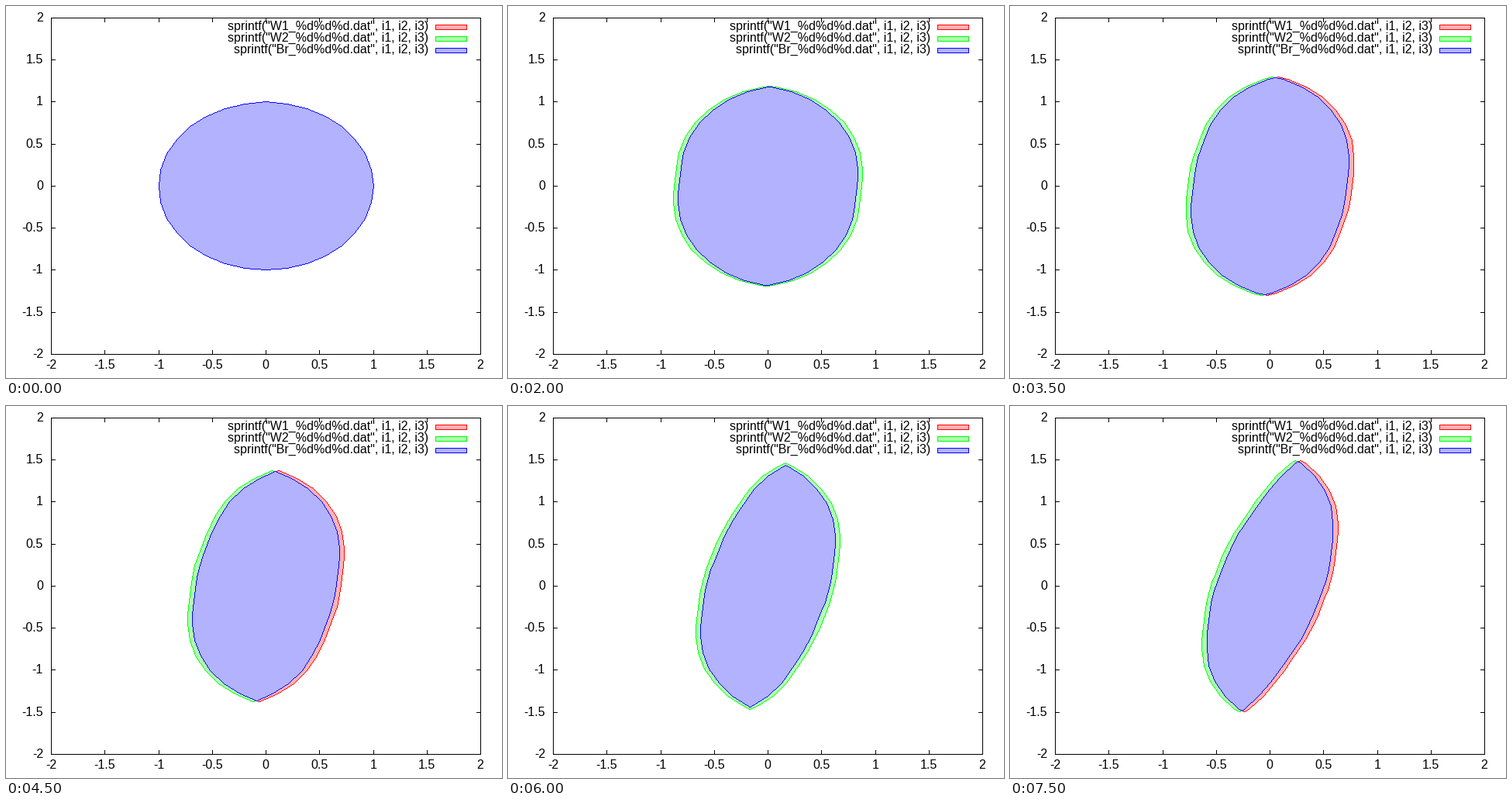
Recreate the animation shown at these times as a matplotlib script. Size 640 by 480 pixels, loop 8 s.

```python
import numpy as np
import matplotlib.pyplot as plt
from matplotlib.animation import FuncAnimation
from matplotlib.path import Path

W, H, DPI = 640, 480, 100
L, R, T, B = 58, 612, 15, 449   # plot frame in pixels
STEPS = 16
TAU = 0.05      # time step, also the reach of the control
Q = 0.045       # reach of the disturbance per step
SIDES = 32      # corners of the starting disc
RED, GREEN, BLUE = (1, 0, 0), (0, 1, 0), (0, 0, 1)


def to_px(pts):
    """Plot coordinates to whole pixels."""
    x, y = np.asarray(pts, float).T
    col = np.floor(L + (x + 2) / 4 * (R - L) + 0.5 + 1e-9)
    row = np.ceil(T + (2 - y) / 4 * (B - T) - 0.5 - 1e-9)
    return np.column_stack([col, row]).astype(int)


def stroke(img, pts, color):
    """Crisp one-pixel polyline."""
    for a, b in zip(pts[:-1], pts[1:]):
        n = np.abs(b - a).max()
        t = np.linspace(0, 1, n + 1)[:, None]
        x, y = np.floor(a + (b - a) * t + 0.5).astype(int).T
        img[y, x] = color


def paint(img, pts, color):
    """Outlined polygon with a 30 % fill."""
    moved = np.any(pts != np.roll(pts, 1, axis=0), axis=1)
    pts = pts[moved]
    (x0, y0), (x1, y1) = pts.min(axis=0), pts.max(axis=0)
    yy, xx = np.mgrid[y0:y1 + 1, x0:x1 + 1]
    inside = Path(pts).contains_points(np.column_stack([xx.ravel(), yy.ravel()]))
    box = img[y0:y1 + 1, x0:x1 + 1]
    box[inside.reshape(xx.shape)] = [0.7 + 0.3 * c for c in color]
    stroke(img, np.vstack([pts, pts[:1]]), color)


def right_side(cut, n):
    """Right boundary, top to bottom: the disc eroded sideways by cut,
    plus n control segments (j * TAU, 1) * TAU."""
    phi = np.linspace(np.pi / 2, -np.pi / 2, 721)
    step = 2 * np.pi / SIDES
    k = np.arange(SIDES // 4, -1, -1)
    tip = np.interp(cut, np.cos(k * step), np.sin(k * step))
    theta = np.round(phi / step) * step
    x = np.cos(theta) - cut
    inside = x > 0
    y = np.where(inside, np.sin(theta), np.sign(phi) * tip)
    x = np.where(inside, x, 0)
    slant = TAU * np.arange(n)
    sign = np.sign(np.cos(phi)[:, None] * slant + np.sin(phi)[:, None])
    x = x + TAU * (sign * slant).sum(axis=1)
    y = y + TAU * sign.sum(axis=1)
    return np.column_stack([x, y])


def closed(side):
    return np.vstack([side, -side])


def crescent(outer, inner):
    """Right part of the outer set, capped just above the inner tip."""
    cap = inner[0, 1] + 0.38 * (outer[0, 1] - inner[0, 1])
    x, y = outer[::-1].T
    ends = np.interp([cap, -cap], y, x)
    body = outer[np.abs(outer[:, 1]) < cap]
    return np.vstack([inner[:1], [(ends[0], cap)], body,
                      [(ends[1], -cap)], inner[-1:]])


fig = plt.figure(figsize=(W / DPI, H / DPI), dpi=DPI, facecolor="white")
ax = fig.add_axes([0, 0, 1, 1])
ax.axis("off")
base = np.ones((H, W, 3))


def line(*pts):
    stroke(base, np.array(pts), (0, 0, 0))


def label(x, y, s, align):
    ax.text(x, y, s, ha=align, va="baseline", family="Liberation Sans",
            size=16 * 72 / DPI)


line((L, T), (R, T), (R, B), (L, B), (L, T))
for v in np.arange(-2, 2.1, 0.5):
    x, y = to_px([(v, v)])[0]
    line((x, B), (x, B - 5))
    line((x, T), (x, T + 5))
    line((L, y), (L + 5, y))
    line((R, y), (R - 5, y))
    label(x, 468, f"{v:g}", "center")
    label(48, y + 5, f"{v:g}", "right")

for i, (name, color) in enumerate([("W1", RED), ("W2", GREEN), ("Br", BLUE)]):
    y = 24 + 15 * i
    label(545, y + 7, f'sprintf("{name}_%d%d%d.dat", i1, i2, i3)', "right")
    paint(base, np.array([(554, y), (594, y), (594, y + 6), (554, y + 6)]), color)

view = ax.imshow(base, extent=(0, W, H, 0), interpolation="nearest",
                 aspect="auto", zorder=0)
ax.set_xlim(0, W)
ax.set_ylim(H, 0)


def draw(n):
    img = base.copy()
    inner = right_side(n * Q, n)
    if n > 0:
        outer = right_side((n - 1) * Q, n)
        if n % 2:
            part = crescent(outer, inner)
            paint(img, to_px(part), RED)
            paint(img, to_px(-part), GREEN)
        else:
            paint(img, to_px(closed(outer)), GREEN)
    paint(img, to_px(closed(inner)), BLUE)
    view.set_data(img)
    return view,


anim = FuncAnimation(fig, draw, frames=STEPS, interval=500, repeat=True,
                     repeat_delay=0, init_func=lambda: draw(0))
plt.show()
```
